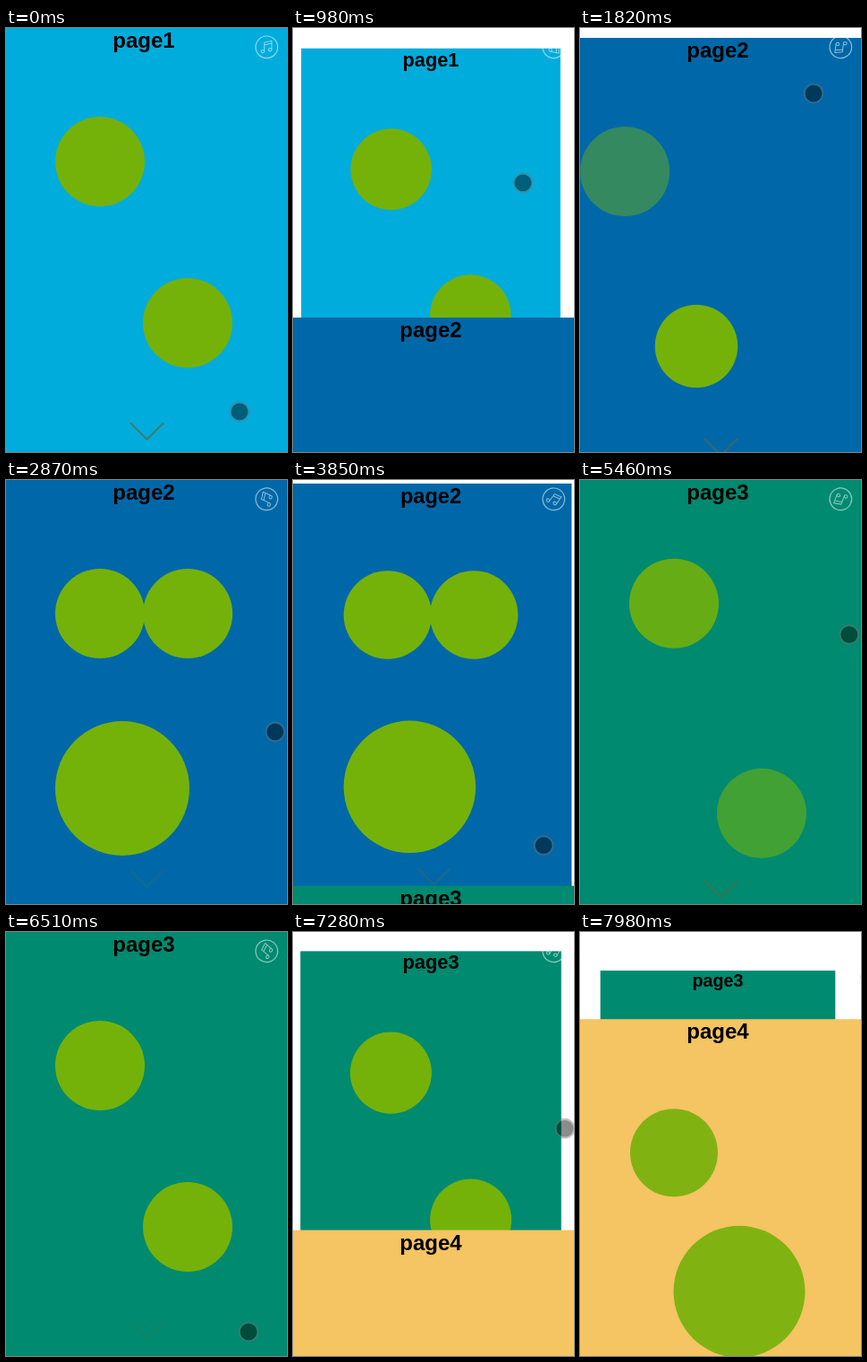
Animation of 314 by 473 pixels, one loop 8 s. Source, as an HTML page:

```html
<!DOCTYPE html>
<html lang="en">
<head>
<meta charset="utf-8">
<title>Swipe pages</title>
<style>
html, body { margin: 0; width: 100%; height: 100%; overflow: hidden; background: #fff; }
svg { display: block; width: 100%; height: 100%; }
text { font: bold 24px Arial, "Liberation Sans", sans-serif; text-anchor: middle; }
</style>
</head>
<body>
<svg id="stage" viewBox="0 0 314 473"></svg>
<script>
const LOOP = 8000, W = 320, H = 480, CX = 154, CY = 240;
const DRAG = 0.615, SHRINK = 0.29, REST = 0.8, SETTLE = 400;
const stage = document.getElementById('stage');

function el(tag, attrs, parent) {
  const node = document.createElementNS('http://www.w3.org/2000/svg', tag);
  set(node, attrs);
  return parent.appendChild(node);
}
function set(node, attrs) {
  for (const k in attrs) node.setAttribute(k, attrs[k]);
}
const clamp = v => Math.max(0, Math.min(1, v));
const mix = (a, b, p) => a + (b - a) * p;

// CSS "ease": cubic-bezier(.25, .1, .25, 1)
function ease(x) {
  if (x <= 0 || x >= 1) return clamp(x);
  const bez = (a, b, u) => 3 * a * u * (1 - u) ** 2 + 3 * b * u * u * (1 - u) + u ** 3;
  let lo = 0, hi = 1;
  for (let i = 0; i < 24; i++) {
    const m = (lo + hi) / 2;
    if (bez(0.25, 0.25, m) < x) lo = m; else hi = m;
  }
  return bez(0.1, 1, lo);
}

// Linear interpolation through rows of [time, ...values]
function track(keys, t) {
  let i = 1;
  while (i < keys.length - 1 && keys[i][0] < t) i++;
  const a = keys[i - 1], b = keys[i];
  const p = clamp((t - a[0]) / (b[0] - a[0]));
  return a.slice(1).map((v, j) => mix(v, b[j + 1], p));
}

// Entrances: elapsed ms -> offset, scale, opacity
const slide = (dx, dy, delay = 0) => ms => {
  const p = ease((ms - delay) / 1100);
  return { x: dx * (1 - p), y: dy * (1 - p), s: 1, o: p };
};
const zoom = ms => {
  const p = ease(ms / 1100);
  return { x: 0, y: 0, s: mix(0.3, 1, p), o: clamp(p * 2.3) };
};
const bounce = ms => {
  const q = clamp(ms / 420);
  const s = q < 0.5 ? mix(0.3, 1.05, ease(q / 0.5))
    : q < 0.7 ? mix(1.05, 0.9, ease((q - 0.5) / 0.2))
    : mix(0.9, 1, ease((q - 0.7) / 0.3));
  return { x: 0, y: 0, s, o: ease(q / 0.5) };
};
const still = () => ({ x: 0, y: 0, s: 1, o: 1 });

const pages = [
  { fill: '#00acdc', dots: [[105, 149, 50, still], [203, 329, 50, still]] },
  { fill: '#0068a8', dots: [[105, 149, 50, slide(-100, 0)], [203, 149, 50, slide(100, 0, 300)], [130, 344, 75, zoom]] },
  { fill: '#008a70', dots: [[105, 149, 50, slide(0, -100)], [203, 329, 50, slide(0, 100, 300)]] },
  { fill: '#f5c463', dots: [[105, 149, 50, bounce], [178, 304, 75, bounce]] }
];

const swipes = [
  { start: 300, release: 1524 },
  { start: 3650, release: 4797 },
  { start: 6850, release: 7848 }
];

const finger = [
  [0, 261, 428], [300, 261, 428], [840, 258, 231], [980, 257, 173], [1524, 261, 73],
  [2000, 261, 73], [2800, 303, 260], [3450, 283, 452], [3650, 281, 452],
  [3850, 280, 408], [4200, 292, 291], [4797, 311, 78], [5200, 311, 78],
  [6200, 272, 440], [6510, 271, 446], [6720, 280, 459], [6850, 282, 459],
  [7560, 318, 64], [7848, 325, 50], [8000, 325, 50]
];

const arrowKeys = [[0, 7, 0.6], [0.5, 0, 0.75], [0.75, -5, 0.25], [1, -5, 0.2]];

pages.forEach((page, i) => {
  page.g = el('g', {}, stage);
  el('rect', { x: CX - W / 2, y: 0, width: W, height: H, fill: page.fill }, page.g);
  el('text', { x: CX, y: 22 }, page.g).textContent = 'page' + (i + 1);
  page.nodes = page.dots.map(([, , r]) => el('circle', { r, fill: '#74b20a' }, page.g));
  page.arrow = el('path', {
    d: 'M139 440.5L157.5 459L176 440.5', fill: 'none', stroke: '#5f6a40', 'stroke-width': 2
  }, page.g);
});

const icon = el('g', { fill: 'none', stroke: '#fff', 'stroke-width': 1, opacity: 0.55 }, stage);
el('circle', { r: 12.3, 'stroke-width': 1.2 }, icon);
el('path', { d: 'M-2.6 4.6V-5.2L5.6 -7V2.8M-2.6 -2.4L5.6 -4.2' }, icon);
el('ellipse', { cx: -4.4, cy: 4.8, rx: 1.9, ry: 1.6 }, icon);
el('ellipse', { cx: 3.8, cy: 3, rx: 1.9, ry: 1.6 }, icon);

const cursor = el('g', {}, stage);
el('circle', { r: 9.5, fill: '#000', 'fill-opacity': 0.45 }, cursor);
el('circle', { r: 10.4, fill: 'none', stroke: '#707070', 'stroke-opacity': 0.42, 'stroke-width': 2 }, cursor);

// How far the incoming page has come (0..1) and the scale of the one behind it
function swipeState({ start, release }, t) {
  const at = time => DRAG * (track(finger, start)[1] - track(finger, time)[1]) / H;
  const pulled = Math.max(0, at(Math.min(t, release)));
  const p = ease((t - release) / SETTLE);
  return { pos: mix(pulled, 1, p), scale: mix(1 - SHRINK * pulled, REST, p) };
}

function render(t) {
  const [ay, ao] = track(arrowKeys, (t / 1200 + 0.5) % 1);
  const states = swipes.map(s => t > s.start ? swipeState(s, t) : { pos: 0, scale: 1 });

  pages.forEach((page, i) => {
    const pos = i ? states[i - 1].pos : 1;
    const next = states[i] || { pos: 0, scale: 1 };
    const shown = pos > 0 && next.pos < 1;
    page.g.setAttribute('display', shown ? 'inline' : 'none');
    if (!shown) return;
    const s = next.scale;
    page.g.setAttribute('transform',
      `translate(${CX * (1 - s)} ${CY * (1 - s) + (1 - pos) * H}) scale(${s})`);
    const ms = i ? t - swipes[i - 1].release : t;
    page.dots.forEach(([x, y, , enter], j) => {
      const a = enter(ms);
      set(page.nodes[j], {
        transform: `translate(${x + a.x} ${y + a.y}) scale(${a.s})`, opacity: a.o
      });
    });
    set(page.arrow, { transform: `translate(0 ${ay})`, opacity: ao });
  });

  icon.setAttribute('transform', `translate(291.3 21.3) rotate(${t / 3500 * 360})`);
  const [x, y] = track(finger, t);
  cursor.setAttribute('transform', `translate(${x} ${y})`);
}

const begin = performance.now();
function tick() {
  render((performance.now() - begin) % LOOP);
  requestAnimationFrame(tick);
}
tick();
</script>
</body>
</html>
```
